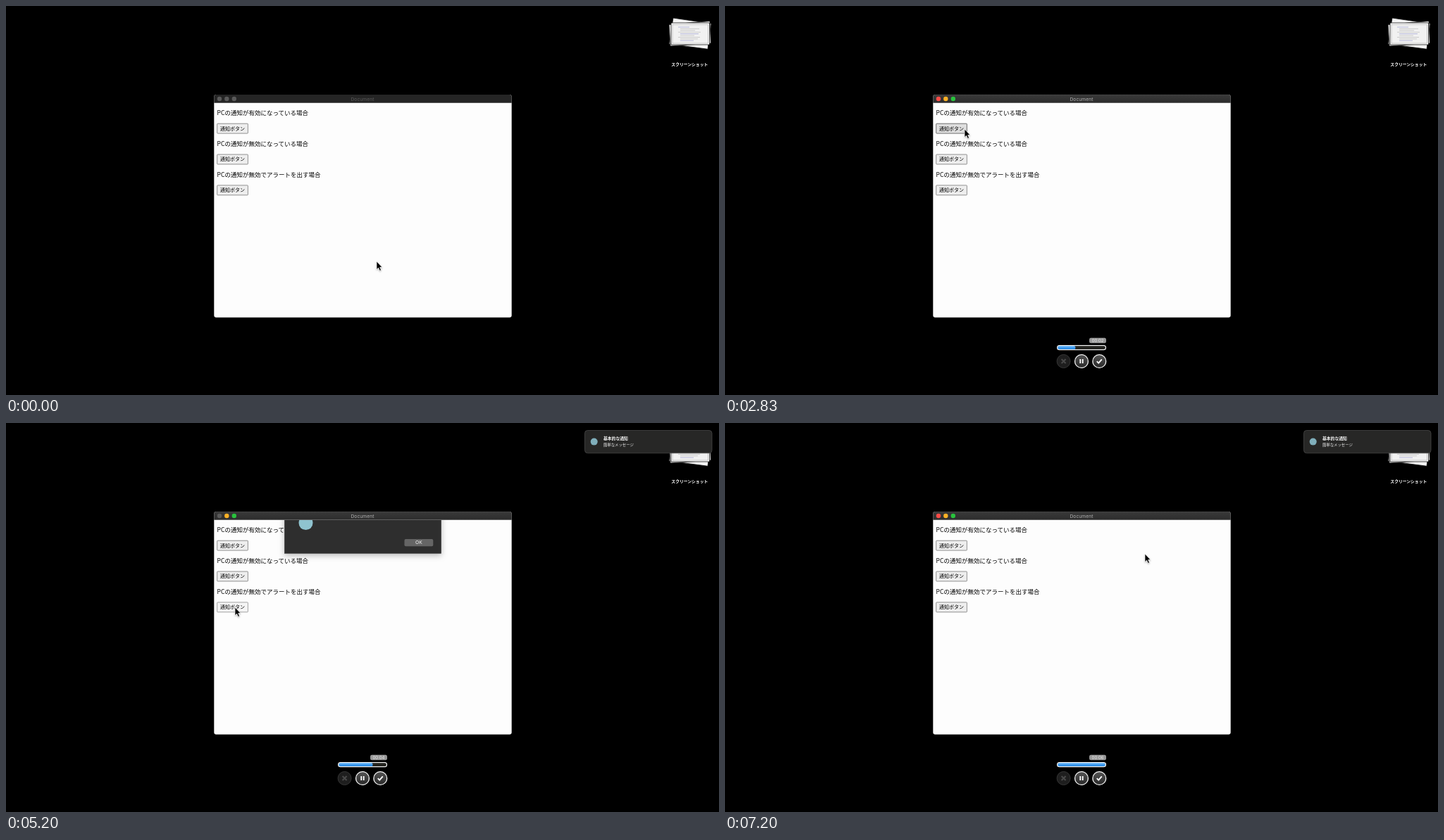
Write an HTML page that moves like this. It is 1012x553 px and loops after 7230 ms.

```html
<!DOCTYPE html>
<html>
<head>
<meta charset="utf-8">
<style>
  html, body { margin: 0; width: 100%; height: 100%; overflow: hidden; background: #000; }
  svg { display: block; width: 1012px; height: 553px; font-family: "Noto Sans CJK JP", "Noto Sans CJK", sans-serif; }
  .ui { font-family: Inter, Roboto, sans-serif; text-anchor: middle; }
  .bold { font-weight: 700; }
</style>
</head>
<body>
<svg viewBox="0 0 1012 553">
  <defs>
    <linearGradient id="bar" x2="0" y2="1"><stop stop-color="#3a3a3a"/><stop offset="1" stop-color="#2c2c2c"/></linearGradient>
    <linearGradient id="blue" x2="0" y2="1"><stop stop-color="#6dbcff"/><stop offset="1" stop-color="#167ee0"/></linearGradient>
    <linearGradient id="gold" x2="0" y2="1"><stop stop-color="#f5b319"/><stop offset="1" stop-color="#e49a00"/></linearGradient>
    <linearGradient id="knob" x2="0" y2="1"><stop stop-color="#555"/><stop offset="1" stop-color="#292929"/></linearGradient>
    <clipPath id="page"><path d="M295 138H718V443H295Z"/></clipPath>
    <filter id="shade" x="-20%" y="-30%" width="140%" height="170%"><feDropShadow dx="0" dy="2.5" stdDeviation="4" flood-opacity=".28"/></filter>
    <filter id="soft" x="-50%" y="-50%" width="200%" height="200%"><feDropShadow dx="0" dy="1" stdDeviation=".8" flood-opacity=".3"/></filter>
  </defs>
  <rect width="1012" height="553"/>

  <!-- desktop stack -->
  <g id="stack" stroke="#111" stroke-width=".8">
    <path d="M947 17L1001 25L996 61.300L941 54Z" fill="#f4f4f4"/>
    <path d="M941 26.500L999 21.500L1000.500 53L943 57Z" fill="#ededed"/>
    <path d="M944 24H998.500V55H944Z" fill="#fff"/>
    <path d="M946 26.500H996.500V53H946Z" fill="#f1f1f1" stroke="#999" stroke-width=".5"/>
  </g>
  <text class="bold" x="970.3" y="85.2" font-size="5.8" fill="#fff" text-anchor="middle">スクリーンショット</text>

  <!-- app window -->
  <rect x="295.300" y="126" width="422.400" height="316.800" rx="3" fill="#fdfdfd"/>
  <path id="title" d="M295.300 137.800V129Q295.300 126 298.300 126H714.700Q717.700 126 717.700 129V137.800Z"/>
  <path id="shine" d="M298 126.300H715" stroke="#4c4c4c" stroke-width=".6"/>
  <g id="lights"><circle cx="303" cy="132" r="3.2"/><circle cx="313.300" cy="132" r="3.2"/><circle cx="323.800" cy="132" r="3.2"/></g>
  <text id="name" class="ui" x="506" y="134.500" font-size="6.8">Document</text>
  <g id="rows"></g>
  <g clip-path="url(#page)">
    <g id="sheet">
      <rect x="395.300" y="130" width="222.400" height="76.300" fill="#2d2d2d" stroke="#484848" stroke-width=".6" filter="url(#shade)"/>
      <circle cx="425.500" cy="163" r="10" fill="#8fc3cf"/>
      <text class="bold" x="452" y="153.200" font-size="6.4" fill="#fff">PCの通知機能が無効になっています</text>
      <rect id="ring" x="563.600" y="183.700" width="44.600" height="14.600" rx="3" fill="#8a681c"/>
      <rect id="ok" x="565.500" y="185.800" width="40.800" height="10.400" rx="2"/>
      <text class="ui" x="585.900" y="193.300" font-size="6.8" fill="#f2f2f2">OK</text>
    </g>
  </g>

  <!-- notification -->
  <g id="note">
    <rect x="821.500" y="10.500" width="180.500" height="32.300" rx="4" fill="#272726" stroke="#474747" stroke-width=".8"/>
    <circle cx="834.700" cy="26.600" r="5" fill="#80afbb"/>
    <text class="bold" x="847.900" y="23.500" font-size="5.85" fill="#f2f2f2">基本的な通知</text>
    <text x="847.900" y="32.900" font-size="5.4" font-weight="500" fill="#eee">簡単なメッセージ</text>
  </g>

  <!-- recorder -->
  <g id="recorder">
    <rect x="517" y="471.800" width="24" height="7.500" rx="2.500" fill="#979797"/>
    <text id="clock" class="ui" x="529" y="477.800" font-size="6" fill="#e8e8e8"></text>
    <rect x="471.600" y="482.700" width="68.900" height="6" rx="3" fill="#22221e"/>
    <rect id="fill" x="472" y="483" height="5.400" rx="2.500" fill="url(#blue)"/>
    <rect x="471.600" y="482.700" width="68.900" height="6" rx="3" fill="none" stroke="#eee" stroke-width="1.200"/>
    <circle cx="480.600" cy="505" r="9.500" fill="#1e1e1e" stroke="#363636"/>
    <path d="M477.600 502L483.600 508M483.600 502L477.600 508" stroke="#494949" stroke-width="2"/>
    <g fill="url(#knob)" stroke="#f2f2f2" stroke-width="1.300"><circle cx="506" cy="505" r="9.400"/><circle cx="531.300" cy="505" r="9.400"/></g>
    <path d="M504.300 502V508M507.700 502V508" stroke="#fff" stroke-width="1.800"/>
    <path d="M527.800 505.200L530.200 507.600L534.800 502.400" fill="none" stroke="#fff" stroke-width="1.900"/>
  </g>

  <path id="cursor" d="M0 0V11.600L2.600 9.200L4.500 13.400L6.500 12.500L4.700 8.500H8Z" stroke="#fff" stroke-width=".7" filter="url(#soft)"/>
</svg>
<script>
const $ = id => document.getElementById(id);
const LOOP = 7230;
const labels = ['PCの通知が有効になっている場合', 'PCの通知が無効になっている場合', 'PCの通知が無効でアラートを出す場合'];
$('rows').innerHTML = labels.map((label, i) => `<g transform="translate(0 ${i * 43.85})" font-weight="500">
  <text x="299.600" y="155.200" font-size="8.5">${label}</text>
  <rect class="btn" x="299.700" y="167.200" width="43.700" height="13.900" rx=".8" stroke-width=".8"/>
  <text x="321.600" y="176.500" font-size="7.03" text-anchor="middle">通知ボタン</text></g>`).join('');
const buttons = document.querySelectorAll('.btn');

// faint text lines on the stacked pages
let lines = '';
for (let i = 0; i < 9; i++) {
  lines += `<path d="M${i % 3 ? 957 : 954} ${30 + i * 2.4}h${16 + i * 11 % 17}" stroke="${i % 4 ? '#b9b9b9' : '#9d9fd0'}" stroke-width=".7"/>`;
}
$('stack').insertAdjacentHTML('beforeend', lines);

// time, x, y of the pointer
const path = [
  [1100, 526, 363], [1550, 337, 170], [1700, 340, 175], [3550, 340, 175],
  [3850, 327, 218], [4170, 327, 218], [4420, 325, 262], [5450, 325, 262],
  [5950, 597, 184], [6900, 597, 184], [7100, 596, 186]
];
const within = (t, a, b) => t >= a && t < b;
const ease = (t, a, b) => {
  const p = Math.min(1, Math.max(0, (t - a) / (b - a)));
  return p * p * (3 - 2 * p);
};
const set = (id, name, value) => $(id).setAttribute(name, value);
const show = (id, on) => set(id, 'visibility', on ? 'visible' : 'hidden');

function pointer(t) {
  let [, x, y] = path[0];
  for (let i = 1; i < path.length; i++) {
    const [a, x0, y0] = path[i - 1], [b, x1, y1] = path[i];
    const p = ease(t, a, b);
    x += (x1 - x0) * p;
    y += (y1 - y0) * p;
  }
  return `translate(${x} ${y})`;
}

const hover = [[2100, 3600], [3780, 4220], [4360, 4850]];
const press = [[2880, 2980], [3950, 4040], [4850, 6820]];

function draw(t) {
  const active = t >= 1830;
  set('title', 'fill', active ? 'url(#bar)' : '#252525');
  show('shine', active);
  set('name', 'fill', active ? '#b0b0b0' : '#5a5a5a');
  const colors = active ? ['#ff4b47', '#fdb125', '#29c33d'] : ['#5a5a5a', '#5a5a5a', '#5a5a5a'];
  if (within(t, 5020, 6820)) colors[0] = '#5a5a5a';
  [...$('lights').children].forEach((dot, i) => dot.setAttribute('fill', colors[i]));

  buttons.forEach((button, i) => {
    const down = within(t, ...press[i]), over = within(t, ...hover[i]);
    button.setAttribute('fill', down ? '#f5f5f5' : over ? '#dedede' : '#eee');
    button.setAttribute('stroke', down ? '#8d8d8d' : over ? '#4f4f4f' : '#767676');
  });

  const drop = ease(t, 5040, 5295) - ease(t, 6600, 6820);
  show('sheet', drop > 0);
  set('sheet', 'transform', `translate(0 ${(drop - 1) * 68})`);
  const ready = within(t, 5295, 6600);
  set('ring', 'opacity', ready ? 1 : 0);
  set('ok', 'fill', ready ? 'url(#gold)' : '#656565');

  show('note', t >= 3020);
  set('note', 'transform', `translate(${192 * (1 - ease(t, 3020, 3400))} 0)`);

  show('recorder', t >= 330);
  set('fill', 'width', Math.max(0, Math.min(68, (t - 230) * .00976)));
  $('clock').textContent = '00:0' + Math.max(0, Math.floor((t - 330) / 1000));
  set('cursor', 'transform', pointer(t));
}

const start = performance.now();
function frame() {
  draw((performance.now() - start) % LOOP);
  requestAnimationFrame(frame);
}
frame();
</script>
</body>
</html>
```
